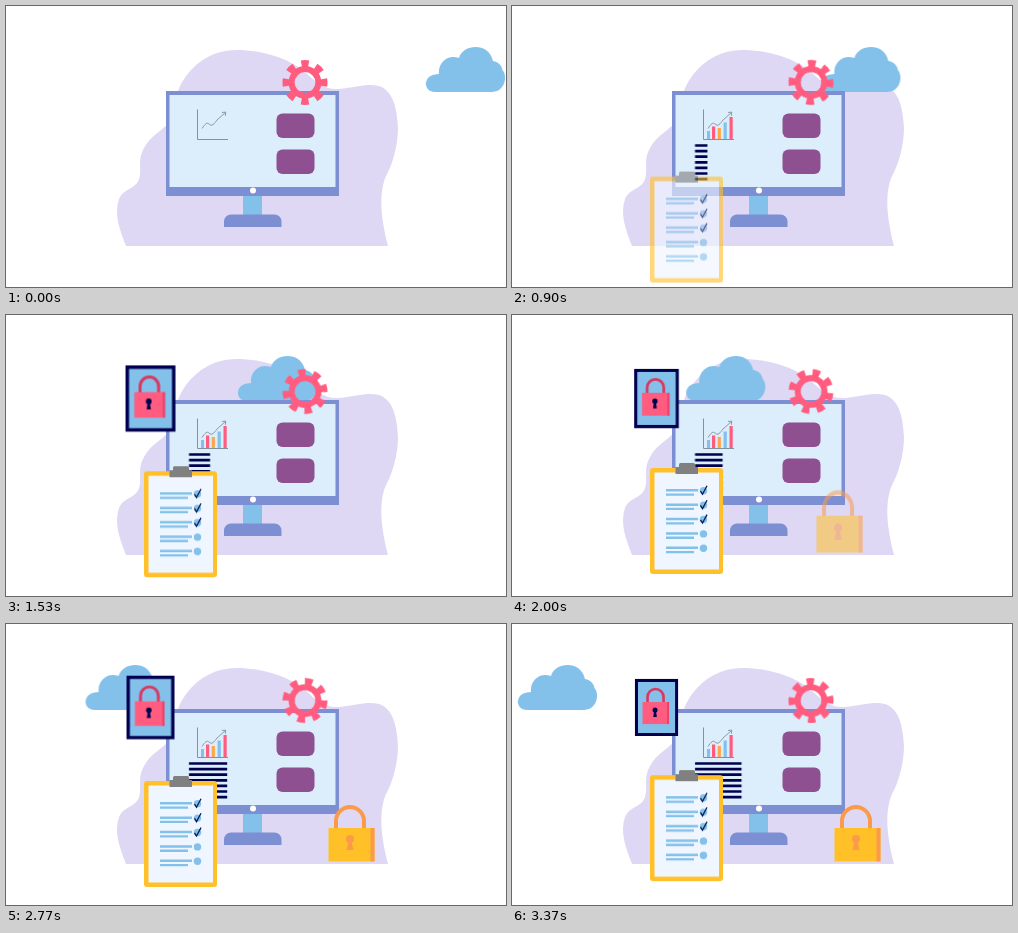
An HTML page without scripts that plays this animation: 500x281 px, repeating every 3410 ms.

```html
<!DOCTYPE html>
<html lang="en">
<head>
<meta charset="utf-8">
<title>Secure workspace</title>
<style>
  html, body { margin: 0; width: 100%; height: 100%; overflow: hidden; background: #fff; }
  svg { display: block; width: 100vw; height: 100vh; }

  :root { --loop: 3410ms; --sine: cubic-bezier(.37, 0, .63, 1); }
  .sky { fill: #83c1eb; }
  .pink { fill: #ff5c7f; }
  .indigo { fill: #7d8fd3; }
  .navy { fill: #00004f; }
  .line { fill: none; }

  .cloud { animation: drift var(--loop) linear infinite; }
  .gear { transform-origin: 299px 76.5px; animation: turn var(--loop) linear infinite; }
  .bars rect { transform-box: fill-box; transform-origin: 50% 100%; animation: grow var(--loop) linear infinite; }
  .text { transform-origin: 183px 0; animation: write var(--loop) linear infinite; }
  .clipboard { animation: bob var(--loop) var(--sine) infinite; }
  .card { transform-origin: 144.5px 83.5px; animation: pulse var(--loop) var(--sine) infinite; }
  .padlock { transform-origin: 345px 238px; animation: arrive var(--loop) var(--sine) infinite; }

  @keyframes drift { to { transform: translateX(-418.9px); } }
  @keyframes turn { to { transform: rotate(180deg); } }
  @keyframes grow { from { transform: scaleY(0); } 14.5%, to { transform: none; } }
  @keyframes write { from { transform: scaleX(0); } }
  @keyframes bob {
    0%, 16.7% { transform: translateY(52px); opacity: 0; animation-timing-function: linear; }
    32.3% { transform: translateY(0); opacity: 1; }
    48.7%, 81.5% { transform: translateY(6px); }
    65.1%, 97.9% { transform: translateY(0); }
    100% { transform: translateY(.3px); opacity: 1; }
  }
  @keyframes pulse {
    0%, 33% { transform: scale(.3); opacity: 0; }
    40% { opacity: 1; }
    43.5% { transform: scale(1.17); }
    48.7%, 81.5% { transform: scale(1.115); }
    65.1%, 97.9% { transform: scale(1); }
    100% { transform: scale(1.005); opacity: 1; }
  }
  @keyframes arrive {
    0%, 49.5% { transform: translateX(13px); opacity: 0; }
    58.65% { transform: translateX(-18px) scaleY(1.1); opacity: .55; }
    64%, 100% { transform: none; opacity: 1; }
  }
</style>
</head>
<body>
<svg viewBox="0 0 500 281" preserveAspectRatio="none">
  <defs>
    <g id="row" class="sky">
      <path d="M154 172h32v2.5h-32zM154 176.4h28v2.3h-28z"/>
      <circle cx="191.5" cy="173.7" r="3.7"/>
    </g>
    <path id="tick" class="line" d="M188.5 174l2 3.2 4.5-8.4" stroke="#0b1a55" stroke-width="1.3"/>
  </defs>

  <path fill="#dfd8f4" d="M120 240C113 222 108 208 113 193C118 181 133 184 134 168C135 160 132 152 138 142C145 128 160 124 166 112C171 100 166 90 180 70C193 53 210 44 230 44C258 44 283 53 298 65C310 76 318 84 333 83C350 81 362 77 373 80C388 85 391 104 392 122C392 140 386 160 380 170C374 184 373 205 382 240Z"/>

  <path class="cloud sky" d="M429 86C417 86 417 70 429 68.5L433 68C432 55 443 48 453 52C457 38 483 36 487 55C493 56 496 60 496.500 64C502 70 499 86 486 86Z"/>

  <g class="monitor">
    <path class="sky" d="M237 189h19v20h-19z"/>
    <path class="indigo" d="M218 221v-5.500a7 7 0 0 1 7-7h43.500a7 7 0 0 1 7 7v5.500zM160 85h173v105H160z"/>
    <path fill="#dcedfb" d="M163.500 89h166v92h-166z"/>
    <circle cx="247" cy="184.500" r="3" fill="#fff"/>
    <g fill="#8f5092">
      <rect x="270.500" y="107.500" width="38" height="24.500" rx="6"/>
      <rect x="270.500" y="143.500" width="38" height="24.500" rx="6"/>
    </g>
  </g>

  <g class="bars">
    <rect class="sky" x="195" y="125" width="3" height="8.500"/>
    <rect class="pink" x="200" y="120.500" width="3.200" height="13"/>
    <rect fill="#ffa64d" x="205.700" y="122" width="3.200" height="11.500"/>
    <rect class="sky" x="211.600" y="116.500" width="3.200" height="17"/>
    <rect class="pink" x="217.500" y="111" width="3.200" height="22.500"/>
  </g>
  <g class="line" stroke="#84919a">
    <path d="M191.500 103.500v30H222"/>
    <path stroke-width=".9" d="M196 122.500C199 118 201 116 203 118C206 121 208 118 211 114L219.500 106.500M216 106.500l3.700-.4-.3 3.700"/>
  </g>

  <path class="text line" d="M183 139.500H230M183 145.100H230M183 150.700H230M183 156.300H230M183 161.900H230M183 167.500H230M183 173.100H230" stroke="#00004f" stroke-width="2.700"/>

  <g class="gear line" stroke="#ff5c7f">
    <circle cx="299" cy="76.500" r="13.400" stroke-width="6"/>
    <circle cx="299" cy="76.500" r="19" stroke-width="7" pathLength="128" stroke-dasharray="8 8" stroke-dashoffset="4"/>
  </g>

  <g class="clipboard">
    <rect x="138" y="151" width="73" height="106" rx="3" fill="#ffc02a"/>
    <path fill="#eff6ff" d="M142.500 155.500H207v97h-64.500z"/>
    <path fill="#808080" d="M163.500 157v-7h3.500v-2.500q0-1.500 1.500-1.500h13q1.500 0 1.500 1.500v2.500h3v7z"/>
    <use href="#row"/>
    <use href="#row" y="14.400"/>
    <use href="#row" y="28.800"/>
    <use href="#row" y="43.200"/>
    <use href="#row" y="57.600"/>
    <use href="#tick"/>
    <use href="#tick" y="14.400"/>
    <use href="#tick" y="28.800"/>
  </g>

  <g class="card">
    <path class="navy" d="M123 55h43v57h-43z"/>
    <path class="sky" d="M126 58h37v51h-37z"/>
    <path class="line" d="M135.500 79v-6a8 8 0 0 1 16 0v6" stroke="#d9385f" stroke-width="2.600"/>
    <path class="pink" d="M130.500 78H157v22h-26.500z"/>
    <path fill="#e8436e" d="M155 78h2v22h-2z"/>
    <circle class="navy" cx="143" cy="86" r="2.500"/>
    <path class="navy" d="M142 87h2l.8 6h-3.600z"/>
  </g>

  <g class="padlock">
    <path class="line" d="M330 205v-8a14 14 0 0 1 28 0v8" stroke="#fb9a4b" stroke-width="4"/>
    <path fill="#ffc127" d="M322.500 204h46v33.500h-46z"/>
    <g fill="#fb9a4b">
      <path d="M364.500 204h4v33.500h-4z"/>
      <circle cx="344" cy="215" r="4"/>
      <path d="M342.500 217h3l2 9h-7z"/>
    </g>
  </g>
</svg>
</body>
</html>
```
